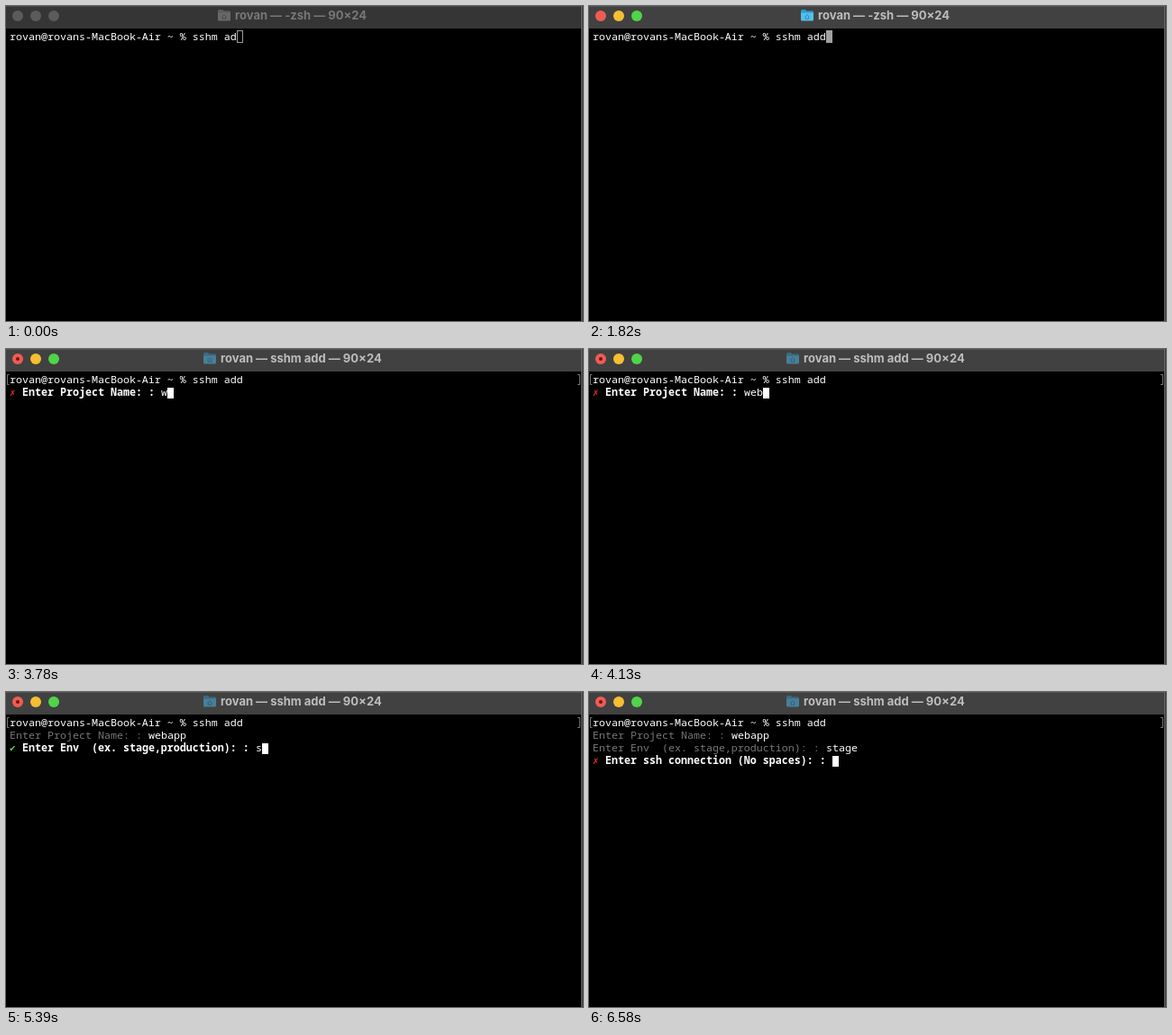
These frames come from a looping animation (640x350 px, 8000 ms). An HTML page:

```html
<!DOCTYPE html>
<html lang="en">
<head>
<meta charset="utf-8">
<title>Terminal</title>
<style>
html, body { margin: 0; width: 100%; height: 100%; overflow: hidden; background: #000; }
svg { display: block; width: 640px; height: 350px; }
text { white-space: pre; }
.term { font: 500 11.667px "Noto Sans Mono", "DejaVu Sans Mono", monospace; fill: #fff; }
.title { font: 700 13px Inter, "Open Sans", sans-serif; }
.bold { font-weight: 700; }
.dim { fill: #777; }
.mark { font: 700 11px "DejaVu Sans Mono", "DejaVu Sans", monospace; }
</style>
</head>
<body>
<svg id="stage" viewBox="0 0 640 350"></svg>
<script>
const LOOP = 8000, CELL = 7, LEFT = 4, ROW = 14;
const USER = "rovan";
const PROMPT = `${USER}@${USER}s-MacBook-Air ~ % `;
const RUN = 2730, FOCUS = 840, RETITLE = 2800;

// Each key is [time, text typed so far].
const COMMAND = [[0, "sshm ad"], [1820, "sshm add"]];
const QUESTIONS = [
  { at: RUN, label: "Enter Project Name: : ", validFrom: 4,
    keys: [[3780, "w"], [3850, "we"], [4130, "web"], [4410, "weba"], [4620, "webap"], [4690, "webapp"]] },
  { at: 5040, label: "Enter Env  (ex. stage,production): : ", validFrom: 1,
    keys: [[5390, "s"], [5670, "sta"], [5950, "stag"], [6090, "stage"]] },
  { at: 6580, label: "Enter ssh connection (No spaces): : ", validFrom: 1, keys: [] }
];

const stage = document.getElementById("stage");

const typed = (keys, t) => keys.reduce((text, [at, value]) => t >= at ? value : text, "");
const column = n => LEFT + n * CELL;
const rect = (x, y, w, h, attrs) => `<rect x="${x}" y="${y}" width="${w}" height="${h}" ${attrs}/>`;
const circle = (x, y, r, fill) => `<circle cx="${x}" cy="${y}" r="${r}" fill="${fill}"/>`;
const text = (col, row, value, cls = "") =>
  `<text class="term ${cls}" x="${column(col)}" y="${38 + row * ROW}">${value}</text>`;

function folder(x, back, front, ink) {
  return `<g transform="translate(${x} 4)">
    <path d="M0 1.5Q0 0 1.5 0H5L6.5 1.5H13Q14 1.5 14 3V5H0Z" fill="${back}"/>
    <path d="M0 3.5H14V11Q14 12.5 12.5 12.5H1.5Q0 12.5 0 11Z" fill="${front}"/>
    <path d="M4.5 8L7 5.7L9.5 8M5.3 7.6V10.3H8.7V7.6" fill="none" stroke="${ink}" stroke-width=".9"/>
  </g>`;
}

function titleBar(t) {
  const active = t >= FOCUS, busy = t >= RETITLE;
  const lights = active ? ["#ee5c54", "#f6be32", "#50d448"] : Array(3).fill("#5b5b5b");
  const icon = !active ? ["#5d5d5d", "#686868", "#484848"]
    : busy ? ["#376b83", "#487f98", "#315f75"]
    : ["#2c9bd0", "#55bfea", "#278cba"];
  const x = busy ? 219 : 235;
  return rect(0, 0, 638, 25, `fill="${active ? "#414141" : "#353535"}"`)
    + rect(0, 0, 638, 1, `fill="${active ? "#555" : "#484848"}"`)
    + lights.map((fill, i) => circle(13 + i * 20, 11, 6, fill)).join("")
    + (busy ? circle(13, 11, 2, "#74130e") : "")
    + folder(x, ...icon)
    + `<text class="title" x="${x + 19}" y="15" fill="${active ? "#bdbdbd" : "#777"}">`
    + `${USER} — ${busy ? "sshm add" : "-zsh"} — 90×24</text>`;
}

function commandLine(t) {
  const line = PROMPT + typed(COMMAND, t);
  const x = column(line.length);
  const tail = t < FOCUS ? rect(x + .5, 27.5, 6, 13, 'fill="none" stroke="#999"')
    : t < RUN ? rect(x, 27, 7, 14, 'fill="#a0a0a0"')
    : '<path d="M3.5 28.5H1.5V39.5H3.5M634 28.5H636.5V39.5H634" fill="none" stroke="#777"/>';
  return text(0, 0, line) + tail;
}

function question({ at, label, validFrom, keys }, i, t) {
  if (t < at) return "";
  const row = i + 1, answer = typed(keys, t);
  const next = QUESTIONS[i + 1];
  if (next && t >= next.at)
    return text(0, row, label, "dim") + text(label.length, row, answer);
  const valid = answer.length >= validFrom;
  const start = label.length + 2;
  return `<text class="mark" x="${LEFT}" y="${38 + row * ROW}" fill="${valid ? "#4fdc3c" : "#e8311f"}">${valid ? "✔" : "✗"}</text>`
    + text(2, row, label, "bold")
    + text(start, row, answer)
    + rect(column(start + answer.length), 29 + row * ROW, 7, 12, 'fill="#fff"');
}

function draw(t) {
  stage.innerHTML = rect(0, 0, 640, 350, 'fill="#000"')
    + titleBar(t)
    + rect(638, 0, 1, 350, 'fill="#6a6a6a"')
    + rect(639, 0, 1, 350, 'fill="#3a3a3a"')
    + commandLine(t)
    + QUESTIONS.map((q, i) => question(q, i, t)).join("");
}

const begin = performance.now();
function tick() {
  draw((performance.now() - begin) % LOOP);
  requestAnimationFrame(tick);
}
tick();
</script>
</body>
</html>
```
